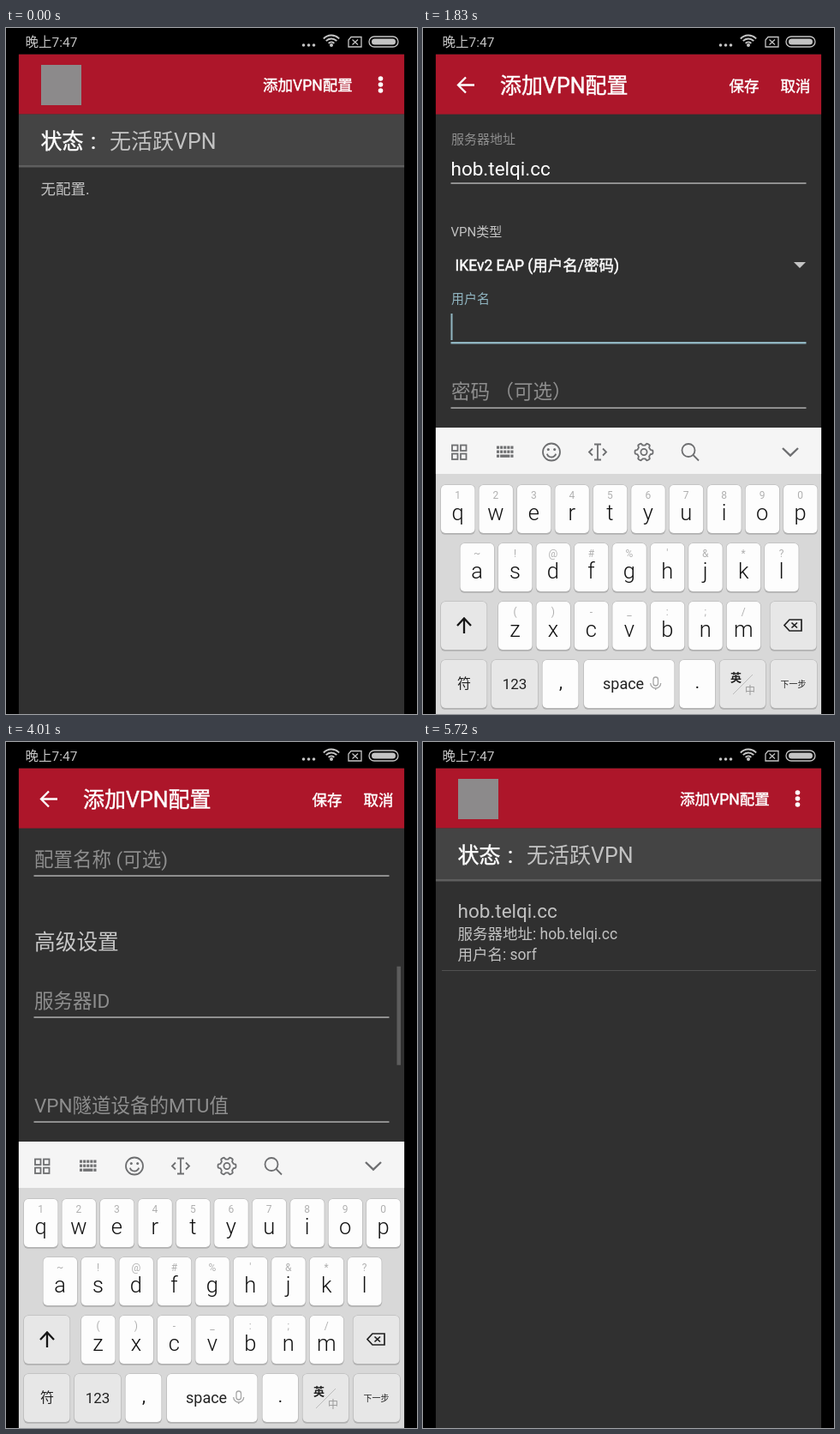
An HTML page with a canvas for the animation above (6120 ms loop, 480 px wide and 800 px high).

```html
<!DOCTYPE html>
<html lang="zh-CN">
<head>
<meta charset="utf-8">
<title>VPN</title>
<style>
html, body { margin: 0; width: 480px; height: 800px; overflow: hidden; background: #000; }
canvas { display: block; }
</style>
</head>
<body>
<canvas id="stage" width="480" height="800"></canvas>
<script>
const c = document.getElementById('stage').getContext('2d');
const FONT = 'Roboto, "Noto Sans CJK SC", "Noto Sans CJK", sans-serif';
const LOOP = 6120;
const SERVER = 'hob.telqi.cc';
const USER = 'sorf';
const RED = '#ad162a', PAGE = '#303030', ACCENT = '#90b5c1', HINT = '#8e8e8e', SOFT = '#c2c2c2', WHITE = '#fff';
const L = 14.7, W = 450.6, TOP = 30.5, BODY = 100.6;

// Bursts of screen updates: [start, count], 70 ms apart
const BURSTS = [[0, 1], [260, 1], [460, 8], [1080, 3], [1420, 1], [1620, 6], [2230, 3], [2500, 5],
  [2910, 2], [3110, 5], [3520, 1], [3590, 9], [4280, 6], [4830, 3], [5170, 7], [5720, 1]];
// Scroll offset over time: [ms, px]
const SCROLL = [[2840, 0], [3110, 217], [3250, 261], [3580, 261], [4150, 535]];

const clamp = v => Math.max(0, Math.min(1, v));
const ramp = (t, from, to) => clamp((t - from) / (to - from));
const easeOut = p => 1 - (1 - p) * (1 - p);
const mix = (a, b, p) => a + (b - a) * p;

function snap(t) {
  const [start, count] = BURSTS.filter(b => b[0] <= t).pop();
  return start + 70 * Math.min(count - 1, Math.floor((t - start) / 70));
}

function scrollAt(t) {
  let y = 0;
  for (let i = 1; i < SCROLL.length; i++) {
    const [t0, y0] = SCROLL[i - 1], [t1, y1] = SCROLL[i];
    if (t >= t0) y = mix(y0, y1, ramp(t, t0, t1));
  }
  return Math.round(y);
}

// ---- drawing helpers ----
function rect(x, y, w, h, color) {
  c.fillStyle = color;
  c.fillRect(x, y, w, h);
}

// y is the optical middle of the line
function text(s, x, y, size, color, align = 'left', weight = 400) {
  c.font = `${weight} ${size}px ${FONT}`;
  c.textAlign = align;
  c.fillStyle = color;
  c.fillText(s, x, y + size * 0.37);
}

// White text a little heavier than regular
function strong(s, x, y, size) {
  text(s, x, y, size, WHITE);
  pen(WHITE, 0.45);
  c.strokeText(s, x, y + size * 0.37);
}

function round(x, y, w, h, r, color) {
  c.fillStyle = color;
  c.beginPath();
  c.roundRect(x, y, w, h, r);
  c.fill();
}

function dot(x, y, r, color) {
  c.fillStyle = color;
  c.beginPath();
  c.arc(x, y, r, 0, 7);
  c.fill();
}

function ring(x, y, r, a = 0, b = Math.PI * 2) {
  c.beginPath();
  c.arc(x, y, r, a, b);
  c.stroke();
}

function line(...p) {
  c.beginPath();
  for (let i = 0; i < p.length; i += 2) c.lineTo(p[i], p[i + 1]);
  c.stroke();
}

function pen(color, width) {
  c.strokeStyle = color;
  c.lineWidth = width;
}

function clipBox(x, y, w, h, draw) {
  c.save();
  c.beginPath();
  c.rect(x, y, w, h);
  c.clip();
  draw();
  c.restore();
}

// ---- system bar ----
function statusBar() {
  const g = '#c4c4c4';
  text('晚上7:47', 22.5, 16.5, 15.5, g);
  for (const x of [347.5, 353.5, 359.5]) dot(x, 20, 1.8, g);
  pen(g, 2);
  for (const r of [4.5, 8.5, 12.5]) ring(380, 21, r, -Math.PI * 0.76, -Math.PI * 0.24);
  dot(380, 20, 2, g);
  pen(g, 1.3);
  c.beginPath();
  c.moveTo(403, 10.5);
  c.lineTo(415, 10.5);
  c.lineTo(415, 22);
  c.lineTo(400, 22);
  c.lineTo(400, 14);
  c.closePath();
  c.stroke();
  line(404.5, 13.5, 411, 19.5);
  line(411, 13.5, 404.5, 19.5);
  c.beginPath();
  c.roundRect(424, 10, 34, 12, 6);
  c.stroke();
  round(427, 12.5, 28, 7, 3.5, g);
}

// ---- profile list ----
function listPage(t) {
  rect(L, TOP, W, 800 - TOP, PAGE);
  rect(L, TOP, W, BODY - TOP, RED);
  rect(41, 43, 47, 47, '#8c8a8b');
  strong('添加VPN配置', 300, 67, 17.5);
  for (const y of [59, 66, 73]) dot(437.5, y, 2.8, WHITE);
  rect(L, BODY, W, 160 - BODY, '#444');
  rect(L, 160, W, 2.5, '#5e5e5e');
  strong('状态', 40.5, 132, 25);
  strong(':', 99, 132, 25);
  text('无活跃VPN', 121, 132, 25, SOFT);
  if (t < 3000) {
    text('无配置.', 40.5, 188, 17.5, SOFT);
  } else {
    text(SERVER, 40.5, 197, 22.5, SOFT);
    text('服务器地址: ' + SERVER, 40.5, 223.5, 17.5, SOFT);
    text('用户名: ' + USER, 40.5, 247.5, 17.5, SOFT);
    rect(22, 266, 437, 1, '#505050');
  }
  if (t >= 260 && t < 600) {
    clipBox(L, 36, W, 97, () => dot(349, 67, 66, 'rgba(255,255,255,.14)'));
  }
}

// ---- profile form ----
// y is the underline; up is how far the hint has floated to a label
function field(y, hint, o = {}) {
  const up = o.up || 0;
  text(hint, 33, mix(y - 19, y - 51.5, up), mix(22.5, 15, up), o.focus && up ? ACCENT : HINT);
  if (o.focus) rect(32.5, y - 1, 415, 2.4, ACCENT);
  else rect(32.5, y - 0.6, 415, 1.3, SOFT);
  let end = 32.5;
  if (o.value) {
    text(o.value, 32.5, y - 17, 22.5, WHITE);
    end += c.measureText(o.value).width;
  }
  for (let i = 0; i < (o.dots || 0); i++) {
    dot(39.5 + i * 13.7, y - 18, 2.6, WHITE);
    end = 49 + i * 13.7;
  }
  if (o.cursor) rect(end, y - 34, 2, 31, ACCENT);
}

function checkBox(y, label, on) {
  if (on) {
    round(36, y - 11.5, 23, 23, 2, ACCENT);
    pen('#2c3336', 2.8);
    line(40, y, 45, y + 5.5, 55, y - 5.5);
  } else {
    pen(SOFT, 2.4);
    c.beginPath();
    c.roundRect(37.2, y - 10.3, 20.6, 20.6, 2);
    c.stroke();
  }
  strong(label, 68, y + 1, 17.5);
}

function advanced(t) {
  text('高级设置', 33, 700.5, 24.7, '#c8c8c8');
  const focus = t >= 4280, pasted = t >= 4560;
  field(789, '服务器ID', {
    focus, up: easeOut(ramp(t, 4210, 4490)),
    value: pasted ? SERVER + ' ' : '',
    cursor: focus && (t < 4830 || t === 4900)
  });
  if (focus) {
    text(`默认为 "${SERVER}"。自定义值将在鉴权期间发送至`, 32.5, 811, 15, SOFT);
    text('服务器', 32.5, 828.5, 15, SOFT);
  }
  field(911, 'VPN隧道设备的MTU值');
  field(1016, '服务器端口');
}

function formFields(t) {
  const onServer = t < 1620, onUser = t >= 1620 && t < 2500, onPass = t >= 2500 && t < 4280;
  field(181, '服务器地址', {
    focus: onServer, up: easeOut(ramp(t, 1010, 1220)),
    value: t >= 1080 ? SERVER : '',
    cursor: onServer && t < 1420
  });
  if (onServer) text('IP地址或服务器域名', 32.5, 203, 15, SOFT);

  text('VPN类型', 32.5, 237.5, 15, SOFT);
  strong('IKEv2 EAP (用户名/密码)', 37.5, 277, 17.5);
  c.fillStyle = '#c4c4c4';
  c.beginPath();
  c.moveTo(433, 273);
  c.lineTo(447, 273);
  c.lineTo(440, 280);
  c.fill();

  const typed = t < 2230 ? 0 : 2 + Math.floor((t - 2230) / 70);
  field(367, '用户名', {
    focus: onUser, up: easeOut(ramp(t, 1550, 1830)),
    value: USER.slice(0, typed), cursor: onUser
  });
  field(443, '密码 （可选）', {
    focus: onPass, up: easeOut(ramp(t, 2430, 2710)),
    dots: Math.max(0, Math.min(4, Math.floor((t - 2500) / 70))),
    cursor: onPass && t < 2910
  });
  if (onPass) text('留空则在要求时弹出', 32.5, 465, 15, SOFT);

  text('CA证书', 32.5, 499.5, 15, SOFT);
  checkBox(534, '自动选择', true);
  field(624, '配置名称 (可选)');
  if (t < 3520) checkBox(689, '显示高级设置', false);
  else advanced(t);
}

function scrollBar(t, y) {
  if (t < 2910) return;
  const [h, max] = t < 3520 ? [206, 261] : [115, 728];
  c.globalAlpha = 1 - ramp(t, 4210, 4420);
  rect(456.5, 101 + (365 - h) * y / max, 4.5, h, '#5c5c5c');
  c.globalAlpha = 1;
}

function formPage(t) {
  const y = scrollAt(t);
  rect(L, TOP, W, 800 - TOP, PAGE);
  clipBox(L, BODY, W, 800 - BODY, () => {
    c.translate(0, -y);
    formFields(t);
  });
  scrollBar(t, y);
  rect(L, TOP, W, BODY - TOP, RED);
  pen(WHITE, 2.3);
  line(41, 66.5, 60, 66.5);
  line(50, 57.5, 41, 66.5, 50, 75.5);
  strong('添加VPN配置', 90, 67, 25);
  strong('保存', 357.5, 67.5, 17.5);
  strong('取消', 417.5, 67.5, 17.5);
}

// ---- keyboard, drawn from its own top edge ----
function key(x, y, w, gray) {
  round(x - 0.6, y - 0.4, w + 1.2, 58.2, 5.5, '#b2b2b2');
  round(x, y, w, 56, 5, gray ? '#e7e7e7' : '#fdfdfd');
}

function letters(x, y, row, hints) {
  [...row].forEach((ch, i) => {
    const kx = x + i * 44.45;
    key(kx, y, 39.5);
    text(hints[i], kx + 19.5, y + 11.5, 12, '#b0b0b0', 'center');
    text(ch, kx + 19.5, y + 32, 25.5, '#111', 'center', 300);
  });
}

function toolbar() {
  const g = '#6e6f71';
  rect(L, 0, W, 54, '#f5f5f5');
  pen(g, 1.8);
  for (const x of [34, 44]) for (const y of [20.5, 30.5]) c.strokeRect(x, y, 6.5, 6.5);
  for (const y of [21.5, 26.5]) for (let i = 0; i < 5; i++) rect(86 + i * 4.1, y, 3.1, 3.3, g);
  rect(86, 31.5, 3.1, 3.3, g);
  rect(90.1, 31.5, 11.3, 3.3, g);
  rect(102.4, 31.5, 3.1, 3.3, g);
  ring(150, 28.5, 10);
  ring(150, 29, 5.5, 0.3, Math.PI - 0.3);
  dot(146.3, 25.5, 1.5, g);
  dot(153.7, 25.5, 1.5, g);
  line(204, 20, 204, 37);
  line(200, 19.5, 208, 19.5);
  line(200, 37.5, 208, 37.5);
  line(198, 24.5, 194, 28.5, 198, 32.5);
  line(210, 24.5, 214, 28.5, 210, 32.5);
  c.beginPath();
  for (let a = 0; a < 6.28; a += 0.06) {
    const r = 9.2 + 1.3 * Math.tanh(3 * Math.cos(a * 6));
    c.lineTo(258 + r * Math.cos(a), 28.5 + r * Math.sin(a));
  }
  c.closePath();
  c.stroke();
  ring(258, 28.5, 3.6);
  ring(310, 26.5, 7.5);
  line(315.5, 32, 322, 38.5);
  pen(g, 2.4);
  line(420, 24, 429, 32.5, 438, 24);
}

function keyboard(top) {
  c.save();
  c.translate(0, top);
  rect(L, 0, W, 340, '#d8d8d8');
  toolbar();
  letters(21, 67, 'qwertyuiop', '1234567890');
  letters(43.5, 135, 'asdfghjkl', "~!@#%'&*?");
  letters(88, 203, 'zxcvbnm', '()-_:;/');

  key(21, 203, 53.5, true);
  pen('#151515', 2.3);
  line(48, 240, 48, 223);
  line(40, 231, 48, 222.5, 56, 231);
  key(405.5, 203, 54, true);
  pen('#222', 1.7);
  c.beginPath();
  [[428, 224], [442, 224], [442, 237], [428, 237], [422, 230.5]].forEach(p => c.lineTo(...p));
  c.closePath();
  c.stroke();
  line(430.5, 227.5, 437, 233.5);
  line(437, 227.5, 430.5, 233.5);

  key(21, 271, 53.5, true);
  text('符', 48, 298.5, 16, '#222', 'center');
  key(80, 271, 54, true);
  text('123', 107, 298.5, 17, '#222', 'center');
  key(139.5, 271, 42, false);
  text(',', 161, 297, 20, '#151515', 'center');
  key(188, 271, 105.5, false);
  text('space', 210, 298, 18, '#222');
  pen('#a8a8a8', 1.3);
  c.beginPath();
  c.roundRect(269, 291, 5.5, 10, 2.7);
  c.stroke();
  ring(271.7, 298, 6, 0, Math.PI);
  line(271.7, 304, 271.7, 306);
  key(299.5, 271, 41.5, false);
  text('.', 320.5, 297, 20, '#151515', 'center');
  key(346.5, 271, 53.5, true);
  text('英', 365.5, 291.5, 13, '#222', 'center', 700);
  text('中', 382, 307, 12, '#999', 'center');
  pen('#bbb', 1);
  line(362, 311, 385, 288);
  key(406, 271, 54, true);
  text('下一步', 432.5, 299.5, 10, '#222', 'center');
  c.restore();
}

// ---- scene ----
function draw(t) {
  rect(0, 0, 480, 800, '#000');
  statusBar();

  let away = 1, kb = 800;
  if (t >= 460) {
    away = 1 - easeOut(ramp(t, 420, 760)) + easeOut(ramp(t, 5220, 5600));
    const hidden = 1 - easeOut(ramp(t, 600, 853)) + ramp(t, 5400, 5680) ** 2;
    kb = Math.round(466 + 334 * hidden);
  }
  const edge = Math.round(450 * away);

  clipBox(L, TOP, W, 800 - TOP, () => {
    if (edge > 0) {
      c.save();
      c.translate(-Math.round(137 * (1 - away)), 0);
      listPage(t);
      c.restore();
      const dim = 0.55 * Math.max(0, 1 - away) ** 0.55;
      rect(L, TOP, W, 800 - TOP, `rgba(0,0,0,${dim})`);
    }
    if (edge < 450) {
      c.save();
      c.translate(edge, 0);
      formPage(t);
      c.restore();
    }
    if (kb < 800) keyboard(kb);
  });
}

const began = performance.now();
function tick() {
  draw(snap((performance.now() - began) % LOOP));
  requestAnimationFrame(tick);
}
tick();
</script>
</body>
</html>
```
